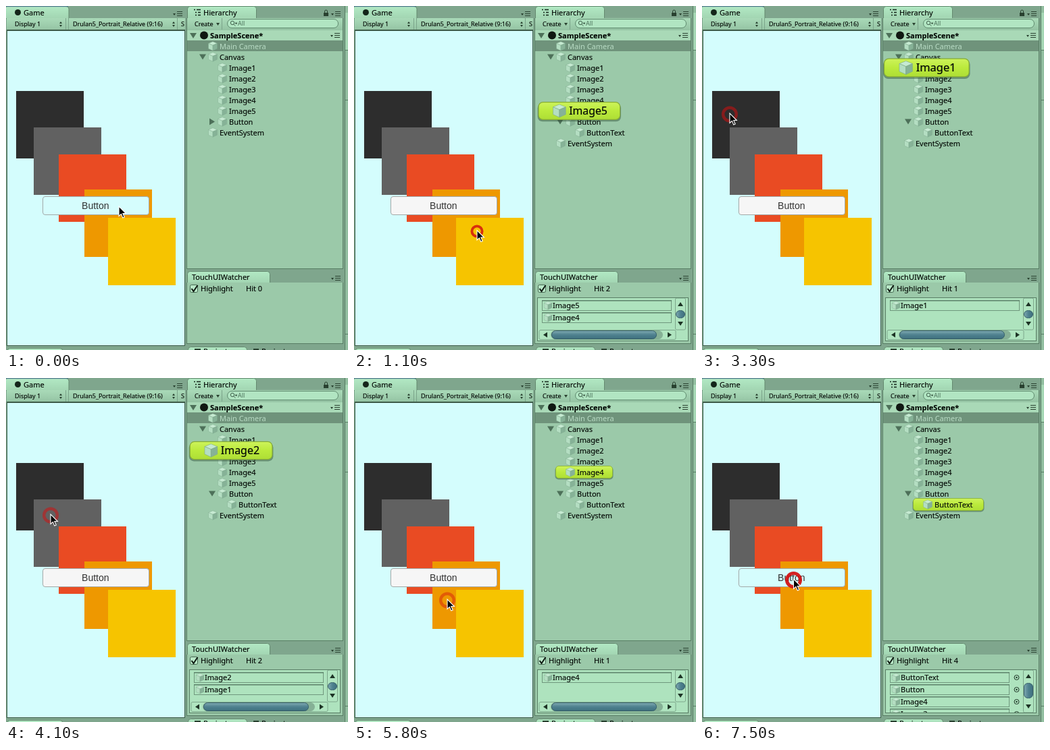
These frames come from a looping animation (506 px wide and 510 px high, 7.6 s). An HTML page:

```html
<!DOCTYPE html>
<html lang="en">
<head>
<meta charset="utf-8">
<title>Editor touch highlight</title>
<style>
  html, body { margin: 0; width: 100%; height: 100%; overflow: hidden; background: #7fa68d; }
  svg { display: block; width: 506px; height: 510px; }
  text { font: 11px "Noto Sans", "Open Sans", sans-serif; fill: #040a06; stroke: #040a06; stroke-width: .15px; white-space: pre; }
  .small { font-size: 9px; }
  .bold { font-weight: 700; }
  .muted { fill: #4f755d; stroke: none; }
  .selected { fill: #b9dcc5; stroke: none; }
  .label { font: 14px "Liberation Sans", Arial, sans-serif; fill: #323232; stroke: none; }
</style>
</head>
<body>
<svg viewBox="0 0 506 510">
  <defs>
    <linearGradient id="bar" x2="0" y2="1"><stop stop-color="#a9dab8"/><stop offset="1" stop-color="#94c3a3"/></linearGradient>
    <linearGradient id="tab" x2="0" y2="1"><stop stop-color="#b2e9c4"/><stop offset="1" stop-color="#a2d5b2"/></linearGradient>
    <linearGradient id="ping" x2="0" y2="1"><stop stop-color="#cdf35a"/><stop offset=".5" stop-color="#bbea3c"/><stop offset="1" stop-color="#aede35"/></linearGradient>
    <linearGradient id="thumbH" x2="0" y2="1"><stop stop-color="#7fa9b1"/><stop offset=".5" stop-color="#4f818f"/><stop offset="1" stop-color="#3f707e"/></linearGradient>
    <linearGradient id="thumbV"><stop stop-color="#7fa9b1"/><stop offset=".5" stop-color="#4f818f"/><stop offset="1" stop-color="#3f707e"/></linearGradient>
    <clipPath id="tree"><rect x="267" y="36" width="232" height="353"/></clipPath>
    <clipPath id="list"><rect x="272" y="433" width="223" height="63"/></clipPath>
    <clipPath id="gameBar"><rect x="2" y="18" width="262" height="18"/></clipPath>
    <g id="cube" stroke="#7ba68b" stroke-width=".4" stroke-linejoin="round">
      <path d="M0-6.7 6.5-4 0-1.2-6.5-4Z" fill="#c6ead2"/>
      <path d="M-6.5-4 0-1.2V6.7L-6.5 3.7Z" fill="#b4dec2"/>
      <path d="M6.5-4 0-1.2V6.7L6.5 3.7Z" fill="#86b297"/>
    </g>
    <g id="menu" stroke="#28402f" fill="#28402f">
      <path d="M0 3h4l-2 3z" stroke="none"/><path d="M6 .5h8M6 3.5h8M6 6.5h8"/>
    </g>
    <path id="sort" d="M-2-1 0-4 2-1ZM-2 1 0 4 2 1Z" fill="#28402f"/>
  </defs>
  <g id="chrome"></g>
  <g id="game"></g>
  <g id="rows" clip-path="url(#tree)"></g>
  <g id="watcher"></g>
  <circle id="ring" fill="none" stroke="#d20f0f"/>
  <path id="cursor" d="M0 0V14.5L3.4 11.4 5.8 17 8.2 16 5.8 10.5H10.4Z" fill="#000" stroke="#fff" stroke-width="1.1"/>
</svg>
<script>
const LOOP = 7600, STEP = 100;
const $ = id => document.getElementById(id);
const rect = (x, y, w, h, fill, extra = '') =>
  `<rect x="${x}" y="${y}" width="${w}" height="${h}" fill="${fill}" ${extra}/>`;
const text = (x, y, s, extra = '') => `<text x="${x}" y="${y}" ${extra}>${s}</text>`;
const use = (id, x, y) => `<use href="#${id}" x="${x}" y="${y}"/>`;
const path = (d, fill, extra = '') => `<path d="${d}" fill="${fill}" ${extra}/>`;
const tab = (x, y, w, h) =>
  path(`M${x} ${y + h}V${y + 4}q0-4 4-4h${w - 8}q4 0 4 4V${y + h}Z`, 'url(#tab)', 'stroke="#64896f"');
const fold = (x, y, open) =>
  path(open ? `M${x - 5} ${y - 4}h10l-5 8z` : `M${x - 4} ${y - 5}v10l8-5z`, '#4d7059');
const arrow = (x, y, angle) =>
  path('M-4 3H4L0-3Z', '#1d3325', `transform="translate(${x} ${y}) rotate(${angle})"`);

const SMALL = 'class="small"';
const PANEL = '#9bc9a9', EDGE = '#587d64';

$('chrome').innerHTML = [
  rect(0, 0, 506, 510, '#7fa68d'),
  // Game panel
  tab(-2, .5, 95, 18), rect(0, 0, 92, 1.2, '#50798c'),
  '<circle cx="17.5" cy="9.5" r="4.5" fill="#14251a"/>',
  text(26, 13.5, 'Game'), use('menu', 247, 8),
  rect(1, 18, 264, 18, 'url(#bar)'),
  rect(88, 18, 1, 17, '#7ba48a'), rect(92, 18, 1, 17, '#7ba48a'), rect(253, 18, 1, 17, '#7ba48a'),
  '<g clip-path="url(#gameBar)">', text(13, 30, 'Display 1', SMALL),
  text(99, 30, 'Drulan5_Portrait_Relative (9:16)', SMALL), text(259, 30, 'Scale', SMALL), '</g>',
  use('sort', 81, 27), use('sort', 248, 27),
  rect(1, 35, 264, 469, '#3d5a48'), rect(2, 37, 262, 466, '#d4fdfd'),
  tab(2, 507.5, 82, 8),
  // Hierarchy panel
  rect(267, 18, 232, 372, EDGE), tab(268.5, .5, 102, 18),
  path('M278 5.5h2m2 0h6M280 9.5h2m2 0h4M280 13.5h2m2 0h4', 'none', 'stroke="#14251a" stroke-width="1.5"'),
  text(292, 13.5, 'Hierarchy'),
  rect(470, 10, 7, 5, '#28402f'), path('M471.5 10V8a2 2 0 0 1 4 0v2', 'none', 'stroke="#28402f"'),
  use('menu', 481, 8),
  rect(268, 18, 230, 18, 'url(#bar)'), rect(319, 18, 1, 17, '#7ba48a'),
  text(279, 30, 'Create', SMALL), path('M311 25h5l-2.5 4z', '#28402f'),
  rect(327.5, 19.5, 164, 13, '#b1e5c2', 'rx="6.5" stroke="#5f8a6e"'),
  '<circle cx="335" cy="25" r="2.7" fill="none" stroke="#44644f"/>',
  path('M337 27l2.5 3M339 25h3l-1.5 2z', '#44644f', 'stroke="#44644f" stroke-width=".8"'),
  text(343, 29, 'All', 'class="small muted"'),
  rect(268, 36, 230, 353, PANEL), rect(268, 36, 230, 15, '#a9d9b7'),
  rect(268, 51, 230, 16, '#6f937b'),
  fold(277, 44, true), '<circle cx="293" cy="43.5" r="6" fill="#101812"/>',
  text(302, 47.5, 'SampleScene*', 'class="bold"'), use('menu', 480, 40),
  // Touch panel
  rect(267, 410, 232, 91, EDGE), tab(268.5, 393.5, 122, 17),
  text(275, 406, 'TouchUIWatcher'), use('menu', 481, 400),
  rect(268, 410, 230, 90, PANEL),
  rect(272.5, 413.5, 11, 11, '#b9e8c8', 'rx="2" stroke="#456751"'),
  path('M274.5 419l3 4 6-9', 'none', 'stroke="#0c170f" stroke-width="2"'),
  text(288, 423, 'Highlight'),
  // Neighbouring panels
  tab(269.5, 505.5, 87, 10), rect(279, 508, 9, 4, '#28402f'), text(292, 515.5, 'Project'),
  rect(366, 508, 8, 4, '#28402f'), text(378, 515.5, 'Project'),
  rect(502, 0, 4, 510, '#92bea0'), rect(501, 0, 1, 510, EDGE),
  rect(502, 10, 4, 55, '#a5d6b4'), rect(502, 65, 4, 1, EDGE), rect(502, 139, 4, 1, EDGE), rect(502, 486, 4, 1, EDGE)
].join('');

const squares = [[15, 126, '#2d2d2d'], [41, 180, '#616161'], [78, 220, '#e94b23'], [116, 272, '#ee9800'], [151, 314, '#f6c400']];
$('game').innerHTML = squares.map(([x, y, fill]) => rect(x, y, 100, 100, fill)).join('') +
  rect(54.5, 282.5, 157, 27, '#f5f5f5', 'id="button" rx="3.5" stroke="#a3a9a8"') +
  text(132.3, 301, 'Button', 'class="label" text-anchor="middle"');

const clicks = [
  { at: 320, x: 142, y: 299, hits: ['ButtonText', 'Button', 'Image4', 'Image3'] },
  { at: 1042, x: 182, y: 333.5, hits: ['Image5', 'Image4'] },
  { at: 1850, x: 140, y: 328.5, hits: ['Image4'] },
  { at: 2390, x: 98, y: 244, hits: ['Image3', 'Image2'] },
  { at: 2770, x: 66, y: 203, hits: ['Image2', 'Image1'] },
  { at: 3166, x: 41, y: 160, hits: ['Image1'] },
  { at: 3960, x: 66, y: 203, hits: ['Image2', 'Image1'] },
  { at: 4769, x: 98, y: 244.5, hits: ['Image3', 'Image2'] },
  { at: 5560, x: 138, y: 329, hits: ['Image4'] },
  { at: 6374, x: 173.5, y: 345.5, hits: ['Image5', 'Image4'] },
  { at: 7500, x: 135.5, y: 299, hits: ['ButtonText', 'Button', 'Image4', 'Image3'] }
];

// Piecewise linear value through [time, value] pairs
function ramp(keys, t) {
  let [t0, v0] = keys[0];
  for (const [t1, v1] of keys) {
    if (t < t1) return v0 + (v1 - v0) * Math.max(0, t - t0) / (t1 - t0);
    [t0, v0] = [t1, v1];
  }
  return v0;
}
const smooth = u => u * u * (3 - 2 * u);

function pointer(t) {
  let from = { at: -200, x: 167, y: 298 };
  for (const c of clicks) {
    const leave = Math.min(from.at + 250, c.at - 200), arrive = c.at - 60;
    if (t < arrive) {
      const u = smooth(Math.max(0, (t - leave) / (arrive - leave)));
      return { x: from.x + (c.x - from.x) * u, y: from.y + (c.y - from.y) * u };
    }
    from = c;
  }
  return from;
}

function hoverAmount(t) {
  const samples = [0, 25, 50, 75].map(d => pointer(Math.max(0, t - d)));
  return samples.filter(p => p.x > 54 && p.x < 212 && p.y > 282 && p.y < 310).length / 4;
}

function pingMark(name, x, y, age) {
  const w = name === 'ButtonText' ? 105 : 85;
  const zoom = ramp([[0, 1], [100, 1.75], [200, 1]], age), pivot = x + 27;
  return `<g transform="translate(${pivot} ${y}) scale(${zoom}) translate(${-pivot} ${-y})">` +
    rect(x - 32.5, y - 8, w + 1, 19, '#2c4a33', 'rx="5" opacity=".45"') +
    rect(x - 31.5, y - 9, w - 1, 18, 'url(#ping)', 'rx="4.5" stroke="#86ac35" stroke-width=".8"') +
    use('cube', x - 10, y) + text(x, y + 4, name) + '</g>';
}

function treeMarkup(click, t) {
  const rows = [['Main Camera', 316], ['Canvas', 316],
    ...[1, 2, 3, 4, 5].map(n => ['Image' + n, 330]), ['Button', 330]];
  if (click) rows.push(['ButtonText', 344]);
  rows.push(['EventSystem', 316]);
  let ping = '';
  const body = rows.map(([name, x], i) => {
    const y = 59.5 + 16 * i;
    if (click && name === click.hits[0]) ping = pingMark(name, x, y, t - click.at);
    const mark = name === 'Canvas' ? fold(291, y, true) : name === 'Button' ? fold(305, y, !!click) : '';
    return mark + use('cube', x - 10, y) + text(x, y + 4, name, i ? '' : 'class="selected"');
  });
  return body.join('') + ping;
}

function watcherMarkup(hits) {
  let out = text(355, 423, 'Hit ' + hits.length);
  if (!hits.length) return out;
  const long = hits.length > 2, w = long ? 176 : 191;
  out += rect(271.5, 432.5, 223, 64, '#aee3be', `stroke="${EDGE}"`) + '<g clip-path="url(#list)">';
  hits.forEach((name, i) => {
    const y = 436.5 + 18 * i;
    out += rect(278.5, y, w, 15, '#aee3be', 'stroke="#6f977d"') + rect(278, y, w + 1, 1, '#537660') +
      `<g transform="translate(287 ${y + 7.5}) scale(.9)">${use('cube', 0, 0)}</g>` + text(294, y + 11.5, name);
    if (long) out += `<circle cx="465.5" cy="${y + 7.5}" r="3.5" fill="none" stroke="#1d3325"/><circle cx="465.5" cy="${y + 7.5}" r="1.2" fill="#1d3325"/>`;
  });
  const bottom = long ? 496 : 480;
  out += rect(475.5, 433, 15, bottom - 433, '#b0e5c0', 'rx="2" stroke="#7da78b"') +
    arrow(483, 442, 0) + arrow(483, long ? 487 : 471, 180) +
    rect(476.5, long ? 452.5 : 451.5, 13, long ? 22 : 11, 'url(#thumbV)', 'rx="6" ry="5.5" stroke="#37606a"');
  if (!long) out += rect(274, 480.5, 202, 14, '#b0e5c0', 'rx="2" stroke="#7da78b"') +
    rect(291, 481, 166, 13, '#86b196', 'rx="6.5"') +
    rect(292.5, 481.5, 155, 12, 'url(#thumbH)', 'rx="6" stroke="#37606a"') +
    arrow(283, 487.5, -90) + arrow(467, 487.5, 90);
  return out + '</g>';
}

function draw(t) {
  const click = clicks.filter(c => c.at <= t).pop();
  const p = pointer(t), ring = $('ring');
  $('rows').innerHTML = treeMarkup(click, t);
  $('watcher').innerHTML = watcherMarkup(click ? click.hits : []);
  $('cursor').setAttribute('transform', `translate(${p.x} ${p.y - 1})`);

  const mix = hoverAmount(t), red = 246 - 33 * mix, rest = 246 + 7 * mix;
  $('button').setAttribute('fill', `rgb(${red},${rest},${rest})`);

  const age = click ? t - click.at : 9999;
  ring.setAttribute('opacity', ramp([[0, .92], [58, .82], [130, .55], [250, .42], [450, 0]], age));
  if (click) {
    ring.setAttribute('cx', click.x);
    ring.setAttribute('cy', click.y + .5);
    ring.setAttribute('r', ramp([[0, 10], [58, 7.6], [120, 9.8]], age));
    ring.setAttribute('stroke-width', ramp([[0, 5], [58, 3.8], [120, 4.4]], age));
  }
}

let start = null, shown = -1;
function frame(now) {
  if (start === null) start = now;
  const t = Math.floor(((now - start) % LOOP) / STEP) * STEP;
  if (t !== shown) draw(shown = t);
  requestAnimationFrame(frame);
}
draw(0);
requestAnimationFrame(frame);
</script>
</body>
</html>
```
